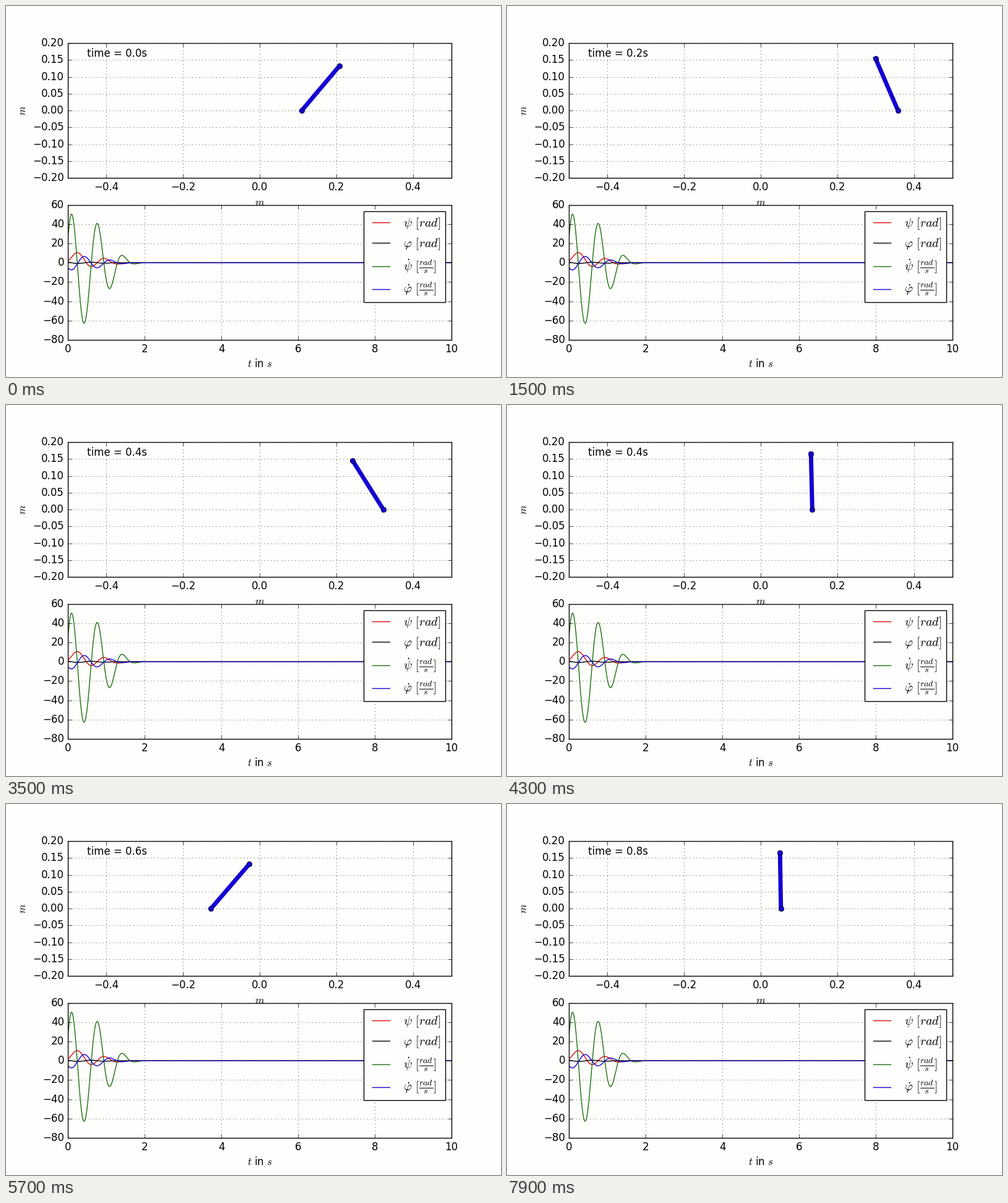
A matplotlib script for the animation above (8000 ms loop, 800 by 600 pixels).

```python
import numpy as np
import matplotlib.pyplot as plt
from matplotlib.animation import FuncAnimation

PAPER = "#fefefc"
RED, BLACK, GREEN, BLUE = "#dc0808", "black", "#1a7010", "#1400d4"
FRAMES = 80
STEP = 0.01          # simulated seconds per frame
LENGTH = 0.165       # pole length in m
RADIUS = 0.0445      # wheel radius in m

plt.style.use("classic")
plt.rcParams.update({
    "font.family": "DejaVu Sans",
    "figure.facecolor": PAPER,
    "axes.facecolor": PAPER,
    "savefig.facecolor": PAPER,
    "savefig.dpi": 100,
    "grid.color": "0.25",
    "ytick.major.pad": 4.4,
})


def motion(t):
    """Foot position and tilt: one damped swing, the foot also drifting home."""
    fade = np.exp(-0.58 * t ** 3.5)
    wave = np.cos(0.54 + 9.16 * t ** 0.94)
    foot = fade * (0.324 * np.exp(-2.1 * t) - 0.25 * wave)
    return foot, 0.745 * fade * wave


def plot_signals(ax):
    t = np.linspace(0, 10, 2001)
    foot, phi = motion(t)
    psi = foot / RADIUS - phi
    gap = r"\hspace{0.38}"
    rate = gap + r"[\frac{rad}{s}]$"
    ax.plot(t, psi, color=RED, label=r"$\psi" + gap + "[rad]$")
    ax.plot(t, phi, color=BLACK, label=r"$\varphi" + gap + "[rad]$")
    ax.plot(t, np.gradient(psi, t), color=GREEN, label=r"$\dot{\psi}" + rate)
    ax.plot(t, np.gradient(phi, t), color=BLUE, label=r"$\dot{\varphi}" + rate)
    ax.legend(loc="upper right")


fig, (top, low) = plt.subplots(2, 1, figsize=(8, 6), dpi=100)

top.set(xlim=(-0.5, 0.5), ylim=(-0.2, 0.2), xlabel="$m$", ylabel="$m$")
top.grid(True)
pole, = top.plot([], [], "o-", color=BLUE, lw=5)
clock = top.text(0.05, 0.9, "", transform=top.transAxes)

plot_signals(low)
low.set(xlim=(0, 10), ylim=(-80, 60), xlabel="$t$ in $s$")
low.grid(True)


def draw(i):
    now = i * STEP
    x, phi = motion(now)
    pole.set_data([x, x + LENGTH * np.sin(phi)], [0, LENGTH * np.cos(phi)])
    clock.set_text(f"time = {now + 1e-9:.1f}s")   # halves round up
    return pole, clock


anim = FuncAnimation(fig, draw, frames=FRAMES, interval=100,
                     repeat=True, repeat_delay=0, blit=False)
plt.show()
```
